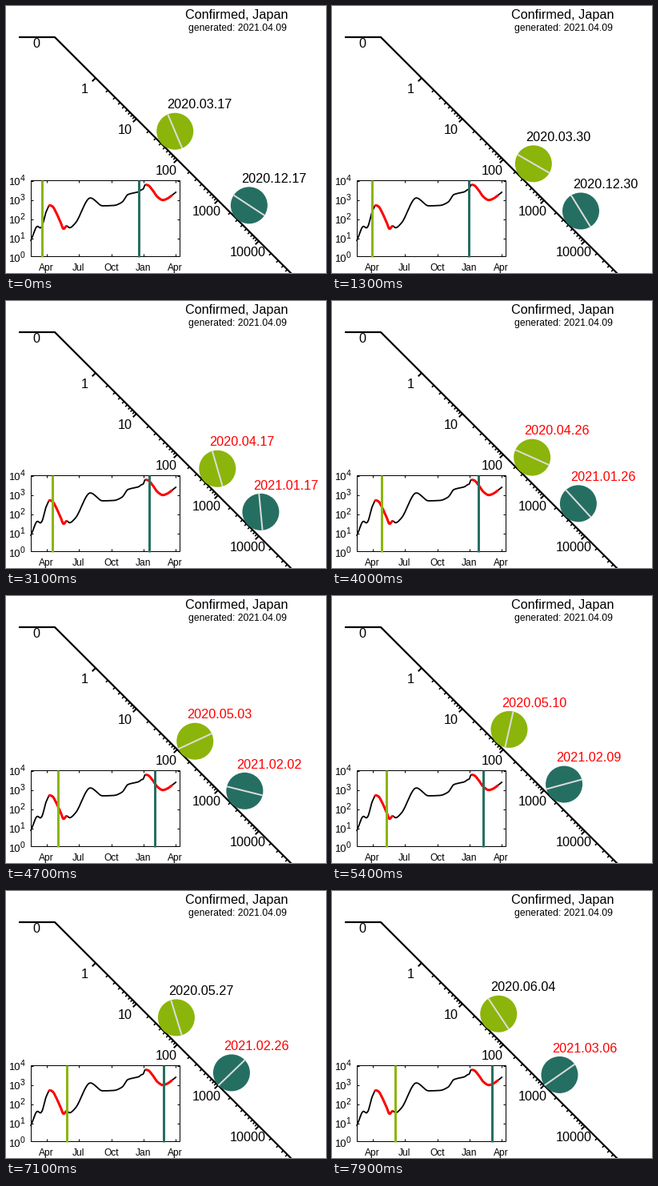
Animation of 400x334 px, one loop 8 s. Source, as a matplotlib script:

```python
import numpy as np
import matplotlib.pyplot as plt
from matplotlib.animation import FuncAnimation
from matplotlib.patches import Circle, Rectangle

W, H, DPI = 400, 334, 100
FRAMES, INTERVAL = 80, 100
PT = 72 / DPI
GREEN, TEAL, SPOKE = "#8bb50a", "#256f62", "#dcdcdc"
START = np.datetime64("2020-03-17")


def day_of(date):
    return int((np.datetime64(date) - START).astype(int))


LAG = day_of("2020-12-17")
ALERTS = [(day_of("2020-04-07"), day_of("2020-05-25")),
          (day_of("2021-01-08"), day_of("2021-03-21"))]

# Turning points of the case curve: (day, log10 of daily cases)
KEYS = np.array([
    (-31, 0.9), (-12, 1.64), (-4, 1.56), (0, 1.627), (13, 2.423), (23, 2.735),
    (31, 2.667), (40, 2.39), (54, 1.827), (62, 1.51), (71, 1.66), (79, 1.568),
    (95, 1.8), (138, 3.12), (173, 2.71), (205, 2.73), (228, 2.9), (245, 3.3),
    (275, 3.443), (283, 3.545), (288, 3.583), (294, 3.81), (302, 3.78),
    (315, 3.522), (329, 3.173), (344, 3.01), (354, 3.063), (381, 3.42)])


def level(day):
    """Monotone cubic through KEYS."""
    x, y = KEYS.T
    h, s = np.diff(x), np.diff(y) / np.diff(x)
    a, b = s[:-1], s[1:]
    inner = np.where(a * b > 0, 2 * a * b / (a + b), 0)
    m = np.concatenate([s[:1], inner, s[-1:]])
    i = np.clip(np.searchsorted(x, day, side="right") - 1, 0, len(h) - 1)
    t = (day - x[i]) / h[i]
    ease = t * t * (3 - 2 * t)
    bend = t * (1 - t) * (m[i] * (1 - t) - m[i + 1] * t)
    return y[i] + (y[i + 1] - y[i]) * ease + h[i] * bend


fig = plt.figure(figsize=(W / DPI, H / DPI), dpi=DPI, facecolor="white")
ax = fig.add_axes([0, 0, 1, 1])
ax.set(xlim=(0, W), ylim=(H, 0))
ax.axis("off")


def line(x, y, width, color="black", cap="butt", **kw):
    return ax.plot(x, y, color=color, lw=width * PT,
                   solid_capstyle=cap, **kw)[0]


def label(x, y, text, size=16.3, ha="center", **kw):
    return ax.text(x, y, text, fontsize=size * PT, ha=ha, va="baseline",
                   family="Liberation Sans", **kw)


# Slope with logarithmic ticks
X0, Y0 = 61, 39
ONE, DECADE = 112, 51
line([16, X0, X0 + 310], [Y0, Y0, Y0 + 310], 2.2)


def slope_tick(value, length, width):
    x = ONE + DECADE * np.log10(value)
    y = x - X0 + Y0
    d = length / np.sqrt(2)
    line([x, x - d], [y, y + d], width)


for k in range(5):
    slope_tick(10 ** k, 6, 2)
    for m in range(2, 10):
        slope_tick(m * 10 ** k, 3.5, 1.6)
    x = ONE + DECADE * k
    label(x - 14, x - X0 + Y0 + 19, str(10 ** k))
label(38, 52.5, "0")

label(288.5, 15.7, "Confirmed, Japan")
label(289.2, 30.6, "generated: 2021.04.09", 12.1)

# Inset chart
LEFT, RIGHT, TOP, BOTTOM = 30.5, 216.5, 217.5, 312.5


def chart_x(day):
    return 44.7 + 0.44 * day


def chart_y(lev):
    return 219 + 24 * (4 - lev)


frame = Rectangle((LEFT, TOP), RIGHT - LEFT, BOTTOM - TOP, fill=False,
                  lw=PT, ec="black")
ax.add_patch(frame)

for k in range(5):
    y = chart_y(k)
    if TOP < y < BOTTOM:
        line([LEFT, LEFT + 3], [y, y], 1)
        line([RIGHT - 3, RIGHT], [y, y], 1)
    label(17.3, y + 5.5, "10", 13, ha="right")
    label(17.3, y, str(k), 10.4, ha="left")

for name, month in zip(["Apr", "Jul", "Oct", "Jan", "Apr"],
                       np.arange("2020-04", "2021-05", 3, "datetime64[M]")):
    x = chart_x(day_of(month.astype("datetime64[D]")))
    line([x, x], [BOTTOM, BOTTOM - 3], 1)
    line([x, x], [TOP, TOP + 3], 1)
    label(x - 0.5, 331, name, 12)


def curve(first, last, width, color):
    d = np.arange(first, last + 1)
    line(chart_x(d), chart_y(level(d)), width, color, cap="round",
         clip_path=frame)


curve(-31, 381, 1.8, "black")
for first, last in ALERTS:
    curve(first, last, 3, "red")


class Ball:
    R = 23

    def __init__(self, color, lag):
        self.lag = lag
        self.bar = line([0, 0], [TOP, BOTTOM + 1], 3, color, zorder=4)
        self.disc = ax.add_patch(Circle((0, 0), self.R, fc=color, ec="none",
                                        zorder=5))
        self.spoke = line([], [], 2, SPOKE, zorder=6)
        self.date = label(0, 0, "", zorder=7)

    def update(self, step):
        day = step + self.lag
        touch = ONE + DECADE * level(day)
        off = self.R / np.sqrt(2)
        cx, cy = touch + off, touch - X0 + Y0 - off
        # rolling without slipping from the top of the slope
        turn = (touch - X0) * np.sqrt(2) / self.R - np.pi / 4
        dx, dy = self.R * np.cos(turn), self.R * np.sin(turn)

        self.disc.center = cx, cy
        self.spoke.set_data([cx - dx, cx + dx], [cy - dy, cy + dy])
        self.bar.set_xdata([chart_x(day)] * 2)
        self.date.set_position((cx + 31, cy - 28.3))
        self.date.set_text(str(START + day).replace("-", "."))
        alert = any(a <= day <= b for a, b in ALERTS)
        self.date.set_color("red" if alert else "black")
        return self.bar, self.disc, self.spoke, self.date


balls = [Ball(GREEN, 0), Ball(TEAL, LAG)]


def update(step):
    return [artist for ball in balls for artist in ball.update(step)]


anim = FuncAnimation(fig, update, frames=FRAMES, interval=INTERVAL,
                     repeat=True, repeat_delay=0, blit=False)
plt.show()
```
